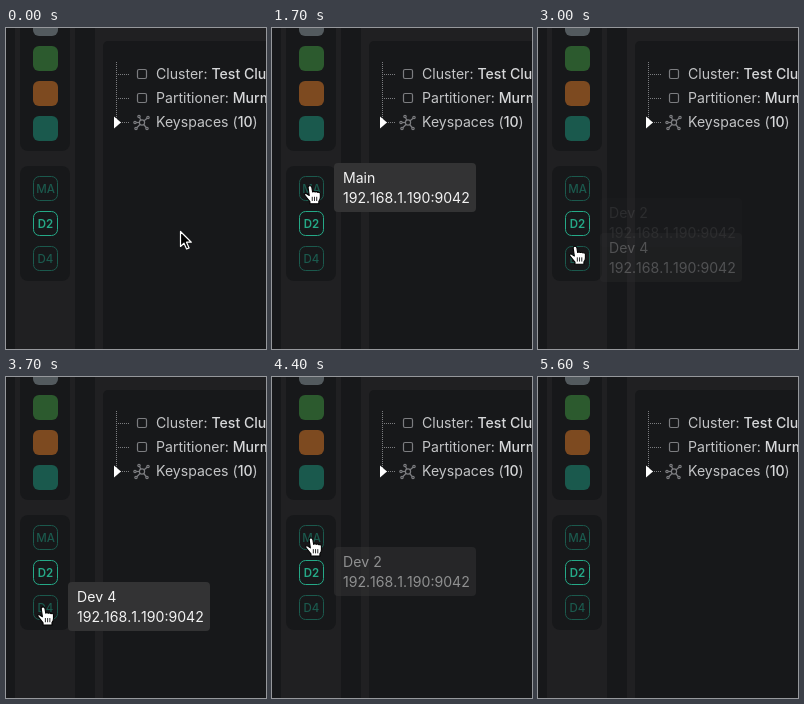
Write an HTML page that moves like this. It is 260 px wide and 321 px high and loops after 5900 ms.

```html
<!DOCTYPE html>
<html lang="en">
<head>
<meta charset="utf-8">
<title>Connection sidebar</title>
<style>
  html, body { margin: 0; width: 100%; height: 100%; overflow: hidden; background: #17181a; }
  svg { display: block; }
  text { font: 14.08px Inter, "Liberation Sans", sans-serif; white-space: pre; }
  .tree { fill: #c3c4c6; }
  .tree tspan { fill: #d6d7d9; font-weight: 500; }
  .badge text { font-size: 11.5px; font-weight: 500; text-anchor: middle; stroke: none; }
  .badge.active text { font-weight: 600; }
  .tip text { fill: #f3f3f3; font-kerning: none; }
</style>
</head>
<body>
<svg width="260" height="321" viewBox="0 0 260 321">
  <path fill="#202022" d="M9 0h60v321H9zM89 0h171v321H89z"/>
  <g fill="#17181a">
    <rect x="14" y="-40" width="50" height="163" rx="8"/>
    <rect x="14" y="138" width="50" height="115" rx="8"/>
    <rect x="97" y="13" width="180" height="330" rx="5"/>
  </g>
  <g id="swatches"></g>
  <g id="badges"></g>

  <g fill="none" stroke="#7c7d80">
    <path stroke-dasharray="1 1" d="M110.5 34v60M112 46.5h12M112 70.5h12M112 94.5h12"/>
    <rect x="131.5" y="41.5" width="9" height="9" rx="1.5" stroke-width="1.2"/>
    <rect x="131.5" y="65.5" width="9" height="9" rx="1.5" stroke-width="1.2"/>
    <g id="hub" fill="#17181a" stroke-width="1.2"></g>
  </g>
  <path fill="#fff" d="M108 88.500l7 6-7 6z"/>
  <g class="tree">
    <text x="150" y="51">Cluster: <tspan>Test Cluster</tspan></text>
    <text x="150" y="75">Partitioner: <tspan>Murmur3Partitioner</tspan></text>
    <text x="150" y="99">Keyspaces (<tspan>10</tspan>)</text>
  </g>

  <g id="tips"></g>
  <g id="cursor" stroke-linejoin="round">
    <path id="arrow" fill="#000" stroke="#fff" stroke-width="1.2"
      d="M.5 .5V15.500l3.500-3.300 2.600 5.800 2.500-1.100-2.600-5.700h4.800z"/>
    <g id="hand" stroke="#000" transform="scale(1.06)">
      <path fill="#fff" d="M-1.700 1.800Q-1.800 0 0 0Q1.500 0 1.800 1.700L2.500 6q1.200-1.200 2.500 0 1.300-.9 2.500.4 1.800-.6 2.300 1V11q0 2-1.400 3.800V17H0v-2Q-2 12.600-4.800 9q-.6-2 1.300-1.600L-.6 9.300z"/>
      <path fill="none" stroke-width=".8" d="M2.200 10.500v4M4.300 10.500v4M6.400 10.500v4"/>
    </g>
  </g>
</svg>
<script>
const LOOP = 5900, STEP = 100, RISE = 300, FALL = 220;
const DIM = '#1b594d', BRIGHT = '#25a987';
const HOME = { x: 174, y: 203 };
const $ = id => document.getElementById(id);

const nodes = [
  { code: 'MA', name: 'Main' },
  { code: 'D2', name: 'Dev 2', active: true },
  { code: 'D4', name: 'Dev 4' }
];
const badgeTop = i => 148 + 35 * i;

// Cursor moves; "show" is when the tooltip of the reached node starts to appear.
const moves = [
  { from: 0, to: 600, x: 38, y: 155, node: 0, show: 870 },
  { from: 1600, to: 2200, x: 37, y: 191, node: 1, show: 1900 },
  { from: 2700, to: 3200, x: 37, y: 233, node: 2, show: 2900 },
  { from: 3600, to: 4200, x: 38, y: 191, node: 1, show: 3900 },
  { from: 4200, to: 4400, x: 39, y: 161, node: 0, show: 4400 },
  { from: 5000, to: 5600, x: 54, y: -25 }
];

$('swatches').innerHTML = ['#535a5e', '#2c5a2e', '#7d4a20', '#1a594d'].map((fill, i) =>
  `<rect x="27" y="${35 * i - 17}" width="25" height="25" rx="6" fill="${fill}"/>`).join('');

$('badges').innerHTML = nodes.map(({ code, active }, i) => {
  const color = active ? BRIGHT : DIM;
  return `<g class="badge ${active ? 'active' : ''}" transform="translate(27 ${badgeTop(i)})"
      fill="${color}" stroke="${color}">
    <rect x=".5" y=".5" width="24" height="24" rx="6" fill="none"/>
    <text x="12.5" y="16.7">${code}</text>
  </g>`;
}).join('');

const spokes = [[-6, 6], [5, 6], [6, -5], [-3, -6], [-7, 0]];
$('hub').innerHTML = spokes.map(([x, y]) =>
  `<path d="M136 94.500l${x} ${y}"/><circle cx="${136 + x}" cy="${94.5 + y}" r="1.2"/>`).join('') +
  '<circle cx="136" cy="94.5" r="2.6"/>';

$('tips').innerHTML = nodes.map(({ name }, i) => `
  <g class="tip" transform="translate(62 ${badgeTop(i) - 13})">
    <rect width="142" height="49" rx="4" fill="#333334"/>
    <text x="9" y="20">${name}</text>
    <text x="9" y="40">192.168.1.190:9042</text>
  </g>`).join('');
const tips = [...$('tips').children];

const clamp = v => Math.min(1, Math.max(0, v));
const smooth = v => { v = clamp(v); return v * v * (3 - 2 * v); };

function cursorAt(t) {
  let { x, y } = HOME;
  for (const m of moves) {
    const k = smooth((t - m.from) / (m.to - m.from));
    x += (m.x - x) * k;
    y += (m.y - y) * k;
  }
  return { x, y };
}

function tipOpacity(node, t) {
  return Math.max(...moves.map((m, i) => {
    if (m.node !== node) return 0;
    const hide = moves[i + 1].from + 100;
    return smooth((t - m.show) / RISE) * (1 - clamp((t - hide) / FALL));
  }));
}

function draw(now) {
  const t = Math.floor(now % LOOP / STEP) * STEP;
  const { x, y } = cursorAt(t);
  const over = x >= 27 && x <= 52 && nodes.some((n, i) => y >= badgeTop(i) && y <= badgeTop(i) + 25);
  $('cursor').setAttribute('transform', `translate(${x} ${y})`);
  $('hand').style.display = over ? '' : 'none';
  $('arrow').style.display = over ? 'none' : '';
  tips.forEach((tip, i) => { tip.style.opacity = tipOpacity(i, t); });
}

const start = performance.now();
function frame() {
  draw(performance.now() - start);
  requestAnimationFrame(frame);
}
frame();
</script>
</body>
</html>
```
